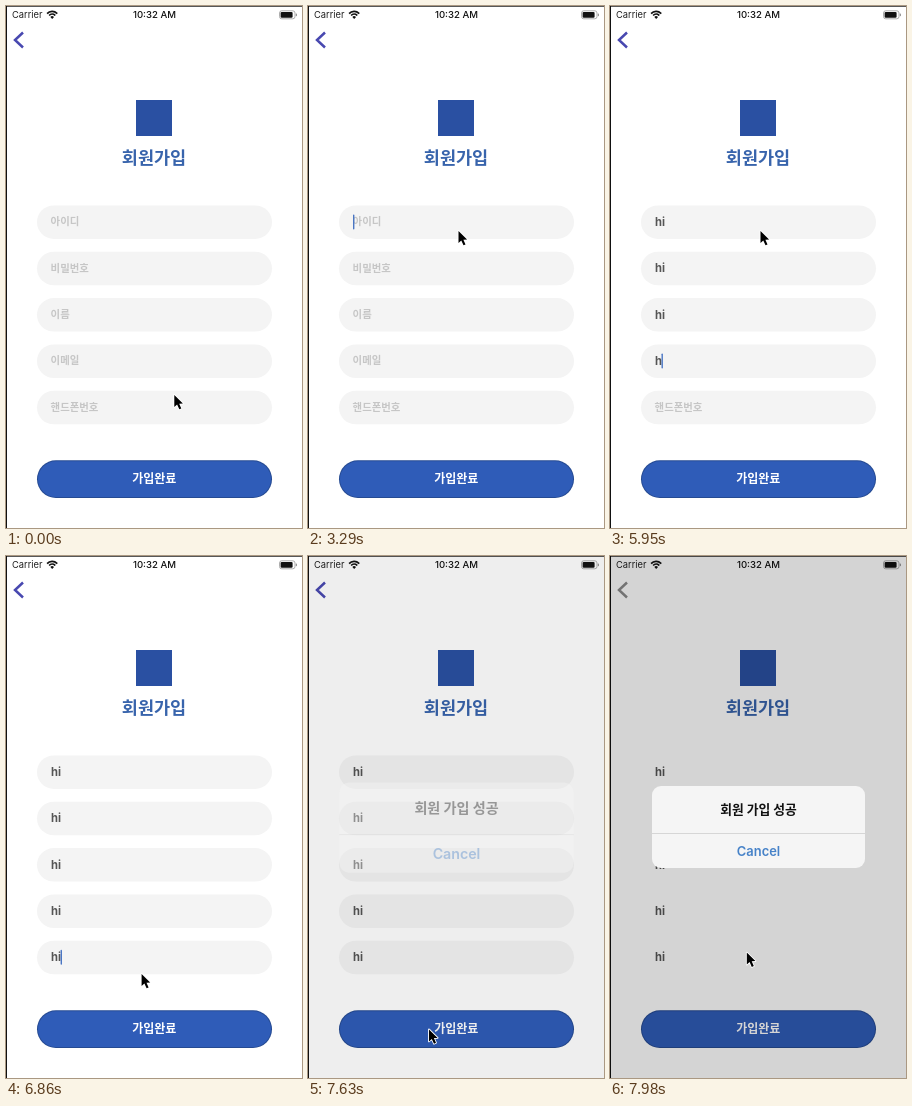
Recreate the animation shown at these times as an HTML page with a canvas. Size 296 by 522 pixels, loop 8000 ms.

```html
<!DOCTYPE html>
<html lang="ko">
<head>
<meta charset="utf-8">
<title>회원가입</title>
<style>
html, body { margin: 0; width: 100%; height: 100%; overflow: hidden; background: #fff; }
canvas { display: block; width: 100vw; height: 100vh; }
</style>
</head>
<body>
<canvas id="stage"></canvas>
<script>
const W = 296, H = 522, LOOP = 8000, STEP = 70;
const KR = '"Noto Sans CJK KR", "Noto Sans CJK JP", "Noto Sans CJK SC", sans-serif';
const UI = 'Inter, Roboto, sans-serif';
const canvas = document.getElementById('stage');
const ctx = canvas.getContext('2d');

// focus, first letter, second letter (ms)
const fields = [
  { label: '아이디', times: [700, 3640, 3780] },
  { label: '비밀번호', times: [4200, 4900, 5040] },
  { label: '이름', times: [5250, 5460, 5530] },
  { label: '이메일', times: [5740, 5950, 6020] },
  { label: '핸드폰번호', times: [6230, 6300, 6370] }
];
const BLUR = 7490;

// time, x, y of the pointer tip
const path = [
  [0, 168.3, 389], [630, 150.5, 225], [6650, 150.5, 225], [6860, 135.6, 418],
  [7420, 121, 473.4], [7630, 121, 473.4], [7910, 136.8, 396.6]
];

const clamp = v => Math.max(0, Math.min(1, v));
const ramp = (t, a, b) => clamp((t - a) / (b - a));
const smooth = p => p * p * (3 - 2 * p);
const mix = (a, b, p) => a + (b - a) * p;
const mixRgb = (a, b, p) => `rgb(${a.map((v, i) => Math.round(mix(v, b[i], p))).join(',')})`;

function pill(x, y, w, h, r, color) {
  ctx.fillStyle = color;
  ctx.beginPath();
  ctx.roundRect(x, y, w, h, r);
  ctx.fill();
}

function text(str, x, cy, size, color, { weight = 400, family = KR, align = 'left' } = {}) {
  ctx.font = `${weight} ${size}px ${family}`;
  ctx.textAlign = align;
  ctx.fillStyle = color;
  ctx.fillText(str, x, cy + size * 0.36);
}

function line(points, color, width) {
  ctx.strokeStyle = color;
  ctx.lineWidth = width;
  ctx.beginPath();
  points.forEach(([x, y]) => ctx.lineTo(x, y));
  ctx.stroke();
}

function statusBar() {
  text('Carrier', 6, 9, 9.3, '#222', { family: UI });
  text('10:32 AM', 148.5, 9, 9.6, '#111', { weight: 500, family: UI, align: 'center' });
  ctx.strokeStyle = '#111';
  ctx.lineWidth = 1.7;
  for (const r of [4.2, 7]) {
    ctx.beginPath();
    ctx.arc(46.2, 12.4, r, -Math.PI * 0.76, -Math.PI * 0.24);
    ctx.stroke();
  }
  ctx.fillStyle = '#111';
  ctx.beginPath();
  ctx.moveTo(46.2, 13);
  ctx.arc(46.2, 12.6, 2.4, -Math.PI * 0.78, -Math.PI * 0.22);
  ctx.fill();
  ctx.strokeStyle = '#999';
  ctx.lineWidth = 0.8;
  ctx.beginPath();
  ctx.roundRect(273.5, 4.8, 15.5, 8, 2.2);
  ctx.stroke();
  pill(274.6, 5.9, 12, 5.8, 1.2, '#111');
  pill(289.8, 7.4, 1.2, 2.8, 0.6, '#999');
}

function caretAlpha(t) {
  if (t < 1750) return 1 - ramp(t, 910, 1120);
  if (t < 2100) return ramp(t, 1610, 1890);
  if (t < 2660) return 1 - ramp(t, 2030, 2240);
  return ramp(t, 2590, 2800);
}

function field(i, t, fill) {
  const { label, times: [focus, first, second] } = fields[i];
  const cy = 216.2 + i * 46.35;
  const leave = i < 4 ? fields[i + 1].times[0] : BLUR;
  const count = (t >= first) + (t >= second);
  pill(31, cy - 16.8, 235, 33.5, 16.75, fill);
  if (count) text('hi'.slice(0, count), 45, cy - 0.2, 11.2, '#555', { weight: 700, family: UI });
  else text(label, 44.6, cy - 0.5, 10.4, '#c6c6c6', { weight: 700 });
  if (t >= focus && t < leave) {
    ctx.globalAlpha = caretAlpha(t);
    pill(45 + [0, 6.5, 9.6][count], cy - 7.8, 1.4, 15, 0.7, '#4a76c4');
    ctx.globalAlpha = 1;
  }
}

function button() {
  pill(31, 454.3, 235, 37.7, 18.85, '#254a92');
  pill(32, 455.3, 233, 35.7, 17.85, '#2f5cb8');
  text('가입완료', 148.3, 473, 12, '#fff', { weight: 700, align: 'center' });
}

function form(t, late) {
  ctx.fillStyle = '#fff';
  ctx.fillRect(0, 0, W, H);
  statusBar();
  line([[17, 26.5], [9, 34], [17, 41.5]], mixRgb([72, 72, 176], [138, 138, 138], late), 2.5);
  ctx.fillStyle = '#2a50a2';
  ctx.fillRect(130, 94, 36, 36);
  text('회원가입', 148, 151.3, 17.5, '#3864ac', { weight: 700, align: 'center' });
  const fill = mixRgb([244, 244, 244], [255, 255, 255], late);
  fields.forEach((_, i) => field(i, t, fill));
  button();
  ctx.fillStyle = '#111';
  ctx.fillRect(0, 0, 1, H);
  ctx.fillRect(0, 0, W, 0.7);
}

function dialog(p) {
  ctx.fillStyle = `rgba(0,0,0,${0.17 * p})`;
  ctx.fillRect(0, 0, W, H);
  ctx.save();
  ctx.globalAlpha = p;
  ctx.translate(148.5, mix(272, 271, p));
  const s = mix(1.165, 1, p);
  ctx.scale(s, s);
  pill(-106.5, -41, 213, 82, 9, '#f5f5f5');
  ctx.fillStyle = '#cfcfcf';
  ctx.fillRect(-106.5, 6, 213, 0.8);
  text('회원 가입 성공', 0, -18, 12.8, '#111', { weight: 700, align: 'center' });
  text('Cancel', 0, 24, 12.9, '#4682c8', { weight: 600, family: UI, align: 'center' });
  ctx.restore();
}

function pointer(t) {
  let i = 0;
  while (i < path.length - 2 && t >= path[i + 1][0]) i++;
  const [a, b] = [path[i], path[i + 1]];
  const p = smooth(ramp(t, a[0], b[0]));
  ctx.save();
  ctx.translate(mix(a[1], b[1], p), mix(a[2], b[2], p));
  ctx.beginPath();
  for (const [x, y] of [[0, 0], [0, 12], [2.8, 9.5], [5, 14.3], [7, 13.4], [4.9, 8.7], [8.6, 8.5]]) ctx.lineTo(x, y);
  ctx.closePath();
  ctx.lineJoin = 'round';
  ctx.strokeStyle = '#fff';
  ctx.lineWidth = 1.8;
  ctx.stroke();
  ctx.fillStyle = '#000';
  ctx.fill();
  ctx.restore();
}

function draw(now) {
  const t = Math.floor((now % LOOP) / STEP) * STEP;
  const dpr = window.devicePixelRatio || 1;
  const w = Math.round(innerWidth * dpr), h = Math.round(innerHeight * dpr);
  if (canvas.width !== w || canvas.height !== h) {
    canvas.width = w;
    canvas.height = h;
  }
  ctx.setTransform(w / W, 0, 0, h / H, 0, 0);
  form(t, ramp(t, 7630, 7840));
  const p = smooth(ramp(t, 7490, 7820));
  if (p > 0) dialog(p);
  pointer(t);
}

const start = performance.now();
function tick() {
  draw(performance.now() - start);
  requestAnimationFrame(tick);
}
tick();
</script>
</body>
</html>
```
